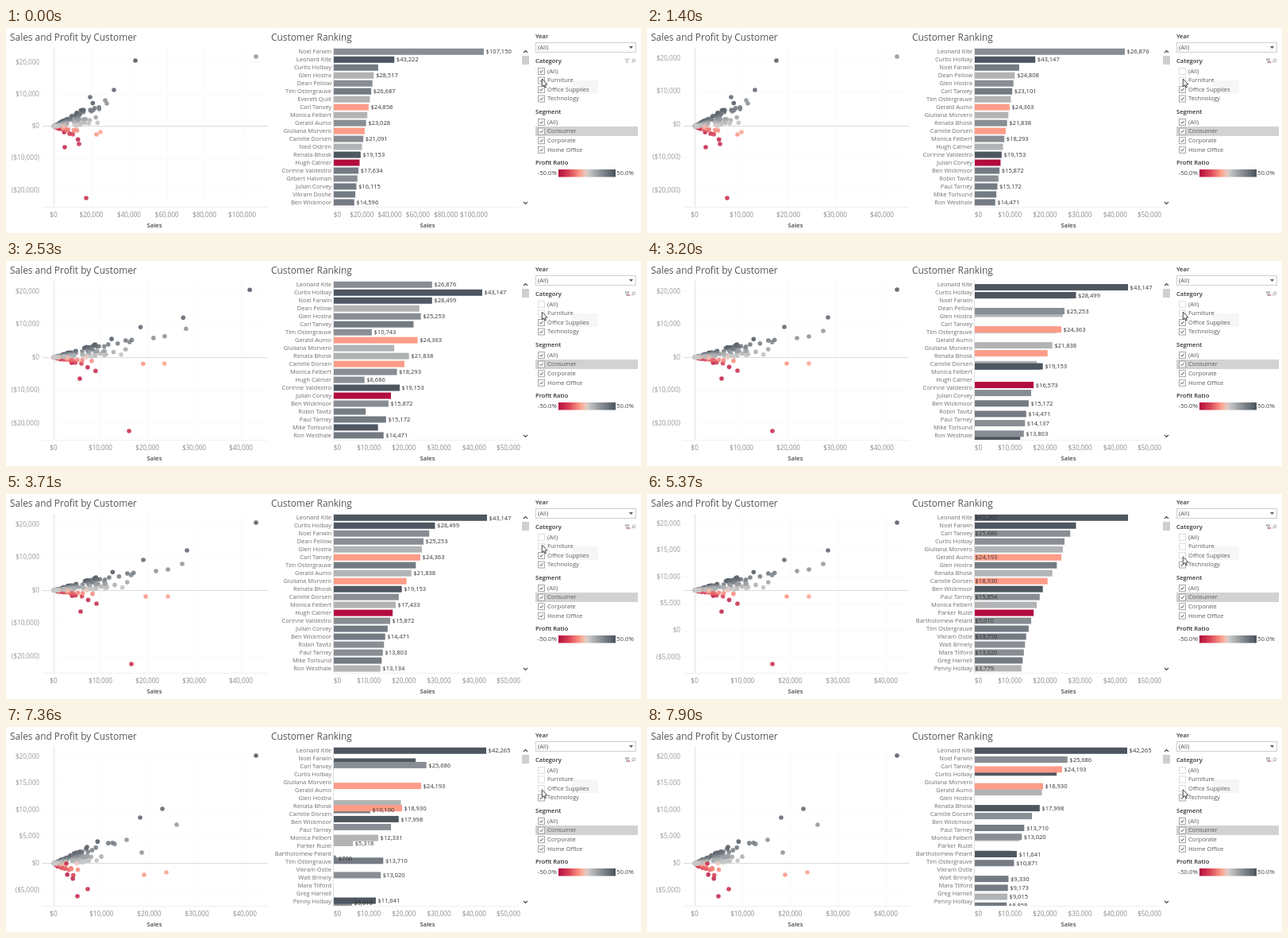
Animation, 800 px wide and 258 px high, one loop 8000 ms. Source, as an HTML page with a canvas:

```html
<!DOCTYPE html>
<html lang="en">
<head>
<meta charset="utf-8">
<title>Sales dashboard</title>
<style>
html, body { margin: 0; width: 100%; height: 100%; overflow: hidden; background: #fff; }
canvas { display: block; width: 800px; height: 258px; }
</style>
</head>
<body>
<canvas id="stage"></canvas>
<script>
const LOOP = 8000;
const FILTER_1 = 760, FILTER_2 = 5370;
const canvas = document.getElementById('stage');
const ctx = canvas.getContext('2d');
const ratio = window.devicePixelRatio || 1;
canvas.width = 800 * ratio;
canvas.height = 258 * ratio;

const clamp = v => Math.max(0, Math.min(1, v));
const lerp = (a, b, t) => a + (b - a) * t;
const span = (t, from, len) => clamp((t - from) / len);
const smooth = t => t * t * (3 - 2 * t);
const easeOut = t => t * (2 - t);
const rowY = i => 29.8 + 9.98 * i;

// Piecewise linear curve through [x, y] keys
function curve(keys, x) {
  let i = 1;
  while (i < keys.length - 1 && x > keys[i][0]) i++;
  const [x0, y0] = keys[i - 1], [x1, y1] = keys[i];
  return lerp(y0, y1, clamp((x - x0) / (x1 - x0)));
}

let seed = 11;
function rnd() {
  seed = (seed * 16807) % 2147483647;
  return seed / 2147483647;
}

// Diverging palette, -1 (loss) to 1 (gain)
const STOPS = [
  [-1, [178, 13, 62]], [-.6, [220, 72, 88]], [-.25, [253, 156, 136]], [-.04, [232, 202, 194]],
  [.06, [200, 200, 200]], [.5, [136, 142, 147]], [1, [74, 82, 93]]
];
const color = v => 'rgb(' + [0, 1, 2].map(k =>
  Math.round(curve(STOPS.map(([x, rgb]) => [x, rgb[k]]), v))).join() + ')';

function text(str, x, y, size, fill, align = 'left', weight = 400) {
  ctx.font = weight + ' ' + size + 'px "Open Sans", "Noto Sans", sans-serif';
  ctx.fillStyle = fill;
  ctx.textAlign = align;
  ctx.textBaseline = 'middle';
  ctx.fillText(str, x, y + .4);
}
function rect(x, y, w, h, fill) {
  ctx.fillStyle = fill;
  ctx.fillRect(x, y, w, h);
}
function path(points) {
  ctx.beginPath();
  points.forEach(([x, y]) => ctx.lineTo(x, y));
}
function stroke(points, style, width = 1) {
  path(points);
  ctx.strokeStyle = style;
  ctx.lineWidth = width;
  ctx.stroke();
}
function fillPoly(points, fill) {
  path(points);
  ctx.fillStyle = fill;
  ctx.fill();
}
function money(v) {
  const s = '$' + Math.round(Math.abs(v)).toLocaleString('en-US');
  return v < 0 ? '(' + s + ')' : s;
}

// One entry per filter state; each axis has a value step and a pixel step
const AXES = [
  { x: { step: 20000, px: 47.5, to: 5 }, y: { step: 10000, px: 40.25, zero: 123.5, from: -2, to: 2 }, bar: { step: 20000, px: 35.3 } },
  { x: { step: 10000, px: 59, to: 4 }, y: { step: 10000, px: 41.5, zero: 121, from: -2, to: 2 }, bar: { step: 10000, px: 44.2 } },
  { x: { step: 10000, px: 60.2, to: 4 }, y: { step: 5000, px: 33.6, zero: 171.5, from: -1, to: 4 }, bar: { step: 10000, px: 44.2 } }
];

const NAMES = [
  ['Noel Farwin', 'Leonard Kite', 'Curtis Holbay', 'Glen Hostra', 'Dean Pellow', 'Tim Ostergrauve',
   'Everett Quill', 'Carl Tanvey', 'Monica Felbert', 'Gerald Aumo', 'Giuliana Morvero', 'Camille Dorsen',
   'Ned Ostrim', 'Renata Bhosk', 'Hugh Calmer', 'Corinne Valdestro', 'Gilbert Halvman', 'Julian Corvey',
   'Vikram Doshe', 'Ben Wickmoor'],
  ['Leonard Kite', 'Curtis Holbay', 'Noel Farwin', 'Dean Pellow', 'Glen Hostra', 'Carl Tanvey',
   'Tim Ostergrauve', 'Gerald Aumo', 'Giuliana Morvero', 'Renata Bhosk', 'Camille Dorsen', 'Monica Felbert',
   'Hugh Calmer', 'Corinne Valdestro', 'Julian Corvey', 'Ben Wickmoor', 'Robin Tavitz', 'Paul Tarney',
   'Mike Torlsund', 'Ron Westhale'],
  ['Leonard Kite', 'Noel Farwin', 'Carl Tanvey', 'Curtis Holbay', 'Giuliana Morvero', 'Gerald Aumo',
   'Glen Hostra', 'Renata Bhosk', 'Camille Dorsen', 'Ben Wickmoor', 'Paul Tarney', 'Monica Felbert',
   'Parker Ruzel', 'Bartholomew Pelant', 'Tim Ostergrauve', 'Vikram Ostle', 'Walt Brinely', 'Mara Tilford',
   'Greg Harnell', 'Penny Holbay']
];

// Sales by rank in each filter state
const SALES = [
  [[0, 107150], [1, 43222], [2, 31700], [3, 28517], [9, 23028], [13, 19153], [19, 14596]],
  [[0, 43147], [1, 28499], [3, 25253], [5, 24363], [7, 21838], [9, 19153], [12, 16573], [15, 14471], [20, 12800], [40, 8686]],
  [[0, 42265], [1, 25686], [3, 22700], [4, 18930], [7, 17998], [9, 13710], [12, 11641], [15, 9330], [19, 8700], [45, 5318], [60, 700]]
];
const edge = (sales, state) => 413 + sales * [1.764, 4.473, 4.543][state] / 1000;

// Light, grey, slate, dark, pink, red
const TONE = { l: .22, g: .5, s: .66, d: .97, p: -.25, r: -1 };
const tones = str => [...str].map(k => TONE[k]);

// Each row's rank after a filter gives its new length and its new place
function makeBars(state, ranks, before, after, entering) {
  const bars = ranks.map((to, from) => {
    const old = curve(SALES[state - 1], from), sales = curve(SALES[state], to);
    return { old, sales, a: edge(old, state - 1), b: edge(sales, state), ca: before[from], cb: after[from], from, to };
  });
  entering.forEach((c, k) => {
    let to = 12;
    while (bars.some(b => b.to === to)) to++;
    const sales = curve(SALES[state], to), end = edge(sales, state);
    bars.push({ old: sales, sales, a: end, b: end, ca: c, cb: c, from: 20.5 + 2 * k, to });
  });
  return bars;
}
const FIRST = makeBars(1, [2, 0, 1, 4, 3, 6, 30, 5, 11, 7, 8, 10, 40, 9, 12, 13, 38, 14, 20, 15],
  tones('gdslgslplgpgldrsgsss'), tones('gddlgsgpllpggdrgssds'), tones('ggsl'));
const sorted = NAMES[2].map((_, i) => FIRST.find(b => b.to === i).cb);
const SECOND = makeBars(2, [0, 3, 1, 60, 45, 2, 14, 5, 4, 7, 8, 11, 50, 46, 50, 9, 50, 10, 46, 50],
  sorted, sorted.map(c => Math.max(c, TONE.p)), tones('dssslsp'));

// Notable customers: x, y at each of the three rests, then colour
const OUTLIERS = [
  [163, 41, 315, 36, 315, 36, .95], [315, 36, 222, 88, 215, 123, .45], [136, 78, 228, 71, 197, 103, .85],
  [106, 87, 173, 83, 169, 114, .85], [125, 91, 204, 95, 171, 158, .5], [127, 95, 189, 97, 152, 142, .5],
  [101, 214, 158, 214, 76, 172, -.8], [119, 131, 204, 129, 202, 183, -.22], [114, 134, 176, 129, 174, 186, -.28],
  [74, 150, 94, 148, 90, 213, -.85], [92, 146, 114, 138, 103, 204, -.8]
].map(p => ({ p, c: p[6] }));

// The crowd fans out from zero; its slope is the profit ratio
const CROWD = Array.from({ length: 165 }, (_, i) => {
  const gain = rnd() < .8;
  const d = Math.pow(rnd(), 2.3) * (gain ? 58 : 32);
  const q = gain ? .04 + rnd() * .92 : -rnd();
  const d1 = d * (1.3 + .5 * rnd());
  const d2 = d1 * (.5 + .3 * rnd());
  return {
    p: [60.5 + d, 123.5 - q * d * .62, 60.5 + d1, 121 - q * d1 * .32, 60.5 + d2, 171.5 - q * d2 * (gain ? .52 : .9)],
    c: gain ? q : q * .9 - .05,
    out1: i % 9 === 0 && d < 8,
    out2: i % 6 === 1 && d1 < 28,
    in1: i % 10 === 5
  };
}).sort((a, b) => Math.abs(b.c) - Math.abs(a.c));
const DOTS = CROWD.concat(OUTLIERS);

function drawScatter(t, state, m1, m2) {
  const { x: ax, y: ay } = AXES[state];
  const place = (p, k) => lerp(lerp(p[k], p[k + 2], m1), p[k + 4], m2);
  for (let i = 0; i <= ax.to; i++) {
    const x = 60 + ax.px * i;
    rect(Math.round(x), 25, 1, 200, '#fafafa');
    text(money(ax.step * i), x, 235, 8.2, '#8c8c8c', 'center');
  }
  for (let i = ay.from; i <= ay.to; i++) {
    const y = ay.zero - ay.px * i;
    rect(46, Math.round(y), 284, 1, '#fafafa');
    text(money(ay.step * i), 42, y, 8.2, '#999', 'right');
  }
  rect(46, 225, 284, 1, '#f0f0f0');
  rect(60, 25, 1, 200, '#e2e2e2');
  rect(46, lerp(lerp(123, 121, m1), 171, m2), 284, 1, '#dcdcdc');
  for (const d of DOTS) {
    let alpha = .86;
    if (d.out1) alpha *= 1 - span(t, 1000, 550);
    if (d.out2) alpha *= 1 - span(t, 5450, 700);
    if (d.in1) alpha *= span(t, 2650, 400);
    ctx.globalAlpha = alpha;
    ctx.fillStyle = color(d.c);
    ctx.beginPath();
    ctx.arc(place(d.p, 0), place(d.p, 1), 2.8, 0, Math.PI * 2);
    ctx.fill();
  }
  ctx.globalAlpha = 1;
  text('Sales', 187, 248.5, 7.6, '#444', 'center', 600);
}

// Largest first; a label is dropped where it would touch one already set
function drawLabels(bars, inside) {
  const shown = [];
  for (const b of bars) {
    const x = inside ? 413.5 : b.end + 2.6;
    if (shown.some(s => Math.abs(s.x - x) < 29 && Math.abs(s.y - b.y) < 10.3)) continue;
    shown.push({ x, y: b.y });
    text(money(b.value), x, b.y + .3, 7.6, '#333');
  }
}

function drawRanking(t, state, m1, m2) {
  const second = state === 2;
  const move = second ? m2 : m1;
  const sortAt = second ? 7265 : 2780;
  const sort = easeOut(span(t, sortAt, 980));
  const axis = AXES[state].bar;

  ctx.save();
  ctx.beginPath();
  ctx.rect(412, 25, 234, 201);
  ctx.clip();
  const placed = (second ? SECOND : FIRST).map(b => ({
    value: state ? b.sales : b.old,
    end: lerp(b.a, b.b, move),
    y: rowY(lerp(b.from, b.to, sort)),
    c: lerp(b.ca, b.cb, move)
  })).sort((p, q) => p.end - q.end);
  placed.forEach(b => rect(413, b.y - 4, b.end - 413, 8, color(b.c)));
  const inside = second && t < sortAt;
  const order = placed.filter(b => b.y < 226).sort((p, q) => inside ? q.value - p.value : q.end - p.end);
  drawLabels(order, inside);
  ctx.restore();

  rect(412, 25, 1, 201, '#dedede');
  rect(412, 225, 234, 1, '#f0f0f0');
  NAMES[state].forEach((n, i) => text(n, 410, rowY(i), 7.5, '#6f6f6f', 'right'));
  for (let i = 0; i <= 5; i++) {
    const x = i ? Math.min(413 + axis.px * i, 633) : 417.5;
    text(money(axis.step * i), x, 235, 8.2, '#8c8c8c', 'center');
  }
  text('Sales', 531, 248.5, 7.6, '#444', 'center', 600);

  rect(650, 35, 9, 11, '#cfcfcf');
  stroke([[652, 31], [654.5, 28.5], [657, 31]], '#444', 1.1);
  stroke([[652, 219], [654.5, 221.5], [657, 219]], '#444', 1.1);
}

function checkbox(label, y, on) {
  rect(670.5, y - 4, 8, 8, '#fff');
  ctx.strokeStyle = on ? '#a6a6a6' : '#dedede';
  ctx.lineWidth = 1;
  ctx.strokeRect(670.5, y - 4, 8, 8);
  if (on) stroke([[672.6, y], [674, y + 1.6], [676.6, y - 1.7]], '#444', .9);
  text(label, 682, y, 7.6, '#5c5c5c');
}

function drawPanel(t) {
  const off1 = t >= 700, off2 = t >= FILTER_2;
  const head = (s, y) => text(s, 667, y, 7.6, '#333', 'left', 600);
  head('Year', 10.5);
  ctx.strokeStyle = '#cfcfcf';
  ctx.lineWidth = 1;
  ctx.strokeRect(667.5, 18.5, 126, 12);
  text('(All)', 670, 24.5, 7.6, '#555');
  fillPoly([[785, 23], [790, 23], [787.5, 26]], '#555');

  head('Category', 41.5);
  stroke([[780, 39], [785, 39], [783, 41.5], [783, 44], [782, 43.5], [782, 41.5], [780, 39]], off1 ? '#777' : '#aaa', .8);
  if (off1) {
    stroke([[783.7, 41.7], [786, 44]], '#c55', .8);
    stroke([[786, 41.7], [783.7, 44]], '#c55', .8);
  }
  ctx.beginPath();
  ctx.arc(791, 40.7, 1.8, 0, Math.PI * 2);
  ctx.strokeStyle = '#999';
  ctx.stroke();
  stroke([[789.7, 42], [788, 43.8]], '#999', .8);

  rect(713, 66, 33, 17, '#f6f6f6');
  ['(All)', 'Furniture', 'Office Supplies', 'Technology'].forEach((s, i) =>
    checkbox(s, 54.5 + 11.5 * i, i === 3 || !(i === 2 ? off2 : off1)));

  head('Segment', 105.5);
  rect(667, 124, 129, 12, '#d2d2d2');
  ['(All)', 'Consumer', 'Corporate', 'Home Office'].forEach((s, i) => checkbox(s, 118.5 + 11.6 * i, true));

  head('Profit Ratio', 169.5);
  text('-50.0%', 694, 182.5, 7.8, '#444', 'right');
  text('50.0%', 769, 182.5, 7.8, '#444');
  const g = ctx.createLinearGradient(696, 0, 768, 0);
  for (let i = 0; i <= 40; i++) g.addColorStop(i / 40, color(i / 20 - 1));
  rect(696, 178, 72, 9.5, g);

  const y = 64 + 14.8 * smooth(span(t, 4120, 750));
  const arrow = [[0, 0], [0, 9.6], [2.2, 7.8], [3.7, 11], [5.1, 10.4], [3.7, 7.3], [6.6, 7], [0, 0]]
    .map(([dx, dy]) => [675.3 + dx, y + dy]);
  fillPoly(arrow, '#fff');
  stroke(arrow, '#333', .9);
}

function draw(t) {
  ctx.setTransform(ratio, 0, 0, ratio, 0, 0);
  rect(0, 0, 800, 258, '#fff');
  const state = t < FILTER_1 ? 0 : t < FILTER_2 ? 1 : 2;
  const m1 = smooth(span(t, 1600, 1080));
  const m2 = smooth(span(t, 6160, 1080));
  text('Sales and Profit by Customer', 5, 12.2, 11.9, '#555');
  text('Customer Ranking', 334, 12.2, 11.9, '#555');
  drawScatter(t, state, m1, m2);
  drawRanking(t, state, m1, m2);
  drawPanel(t);
}

const begin = performance.now();
function tick() {
  draw((performance.now() - begin) % LOOP);
  requestAnimationFrame(tick);
}
tick();
</script>
</body>
</html>
```
